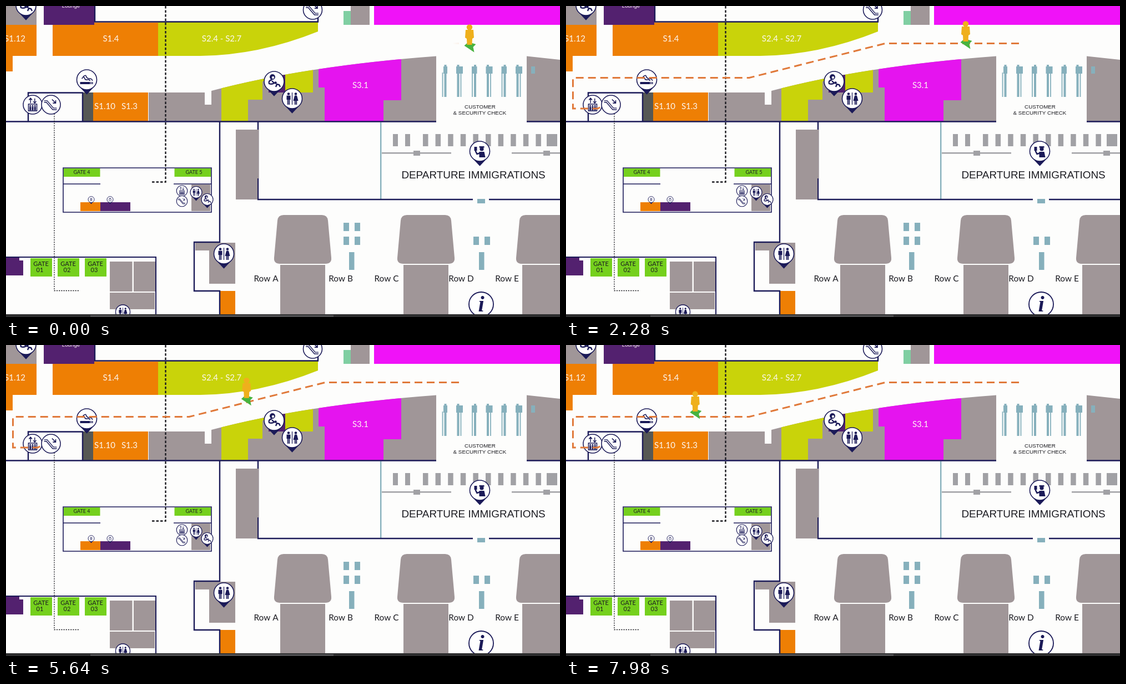
An HTML page with a canvas for the animation above (8 s loop, 998x561 px).

```html
<!DOCTYPE html>
<html lang="en">
<head>
<meta charset="utf-8">
<title>Terminal map walk</title>
<style>
  html, body { margin: 0; width: 100%; height: 100%; overflow: hidden; background: #fdfdfc; }
  canvas { display: block; width: 998px; height: 561px; }
</style>
</head>
<body>
<canvas id="stage" width="998" height="561"></canvas>
<script>
const W = 998, H = 561, LOOP = 8000;
const NAVY = '#1b1a58', GREY = '#a09698', STEEL = '#a1a1a5', ORANGE = '#ee7f04', LIME = '#c9d30a',
      PURPLE = '#53216f', GREEN = '#75d01d', TEAL = '#86b0bc', PINK = '#e514ef',
      WHITE = '#fdfdfc', PALE = '#fdf8f2', BLACK = '#1c1c22';
const GEO = 'Lato, sans-serif', ARIAL = '"Liberation Sans", Arial, sans-serif';

const stage = document.getElementById('stage').getContext('2d');
const map = document.createElement('canvas');
map.width = W;
map.height = H;
const c = map.getContext('2d');

function box(color, x, y, w, h) {
  c.fillStyle = color;
  c.fillRect(x, y, w, h);
}

// A row of n equal boxes, dx apart.
function row(color, n, dx, x, y, w, h) {
  for (let i = 0; i < n; i++) box(color, x + i * dx, y, w, h);
}

function fill(color, path) {
  c.fillStyle = color;
  c.fill(new Path2D(path));
}

function line(color, width, path, dash = []) {
  c.strokeStyle = color;
  c.lineWidth = width;
  c.setLineDash(dash);
  c.stroke(new Path2D(path));
}

const wall = path => line(NAVY, 2.4, path);

function dot(color, x, y, r) {
  c.fillStyle = color;
  c.beginPath();
  c.arc(x, y, r, 0, 7);
  c.fill();
}

function label(str, x, y, size, color = BLACK, font = GEO) {
  c.fillStyle = color;
  c.font = `${size}px ${font}`;
  c.textAlign = 'center';
  c.fillText(str, x, y);
}

// Pictograms, drawn around 0,0 for a badge of radius 18.
const glyphs = {
  people() {
    for (const x of [-6.5, 6.5]) {
      dot(NAVY, x, -8.5, 2.3);
      row(NAVY, 2, 2.6, x - 2.2, 1, 1.8, 10);
    }
    box(NAVY, -10, -5.4, 7, 7.5);
    fill(NAVY, 'M4.5-5.4h4l2.5 9.5h-9z');
    box(NAVY, -.6, -11, 1.2, 22);
  },
  baby() {
    dot(NAVY, -3, -8, 5);
    dot('#fff', -2, -7, 2.2);
    line(NAVY, 2.4, 'M-4-3Q-11-1-9 4Q-4 6 0 3L-4-1');
    dot(NAVY, 2.5, 2.5, 2.3);
    line(NAVY, 2.4, 'M4 5L9 6L11 10M5 5L3 10');
  },
  smoke() {
    box(NAVY, -12, 4, 18, 4);
    row(NAVY, 2, 2.5, 7, 4, 1.5, 4);
    line(NAVY, 1.6, 'M10 2Q10-2 5-2T-1-6T-7-5M6 2Q5-1 1 0T-4-3T-9-2');
  },
  lift() {
    line(NAVY, 1.6, 'M-8-1H8V12H-8Z');
    for (const x of [-4.5, 0, 4.5]) {
      dot(NAVY, x, 2.3, 1.5);
      box(NAVY, x - 1.6, 4, 3.2, 7);
    }
    line(NAVY, 1.5, 'M-4-3V-12M-7-9l3-3.5l3 3.5M4-12V-3M1-6.5l3 3.5l3-3.5');
  },
  escalator() {
    const ramp = 'M-13-6H-8L4 8H11';
    line(NAVY, 4.6, ramp);
    line('#fff', 1.6, ramp);
    line(NAVY, 1.7, 'M2-10L9-3M9-8.5V-3H3.5');
  },
  officer() {
    box(NAVY, -10, -8, 5, 7);
    box(NAVY, -1, -9, 9, 2.6);
    dot(NAVY, 3.5, -4, 3.6);
    fill(NAVY, 'M-1 1H8L10 11H-1Z');
    line(NAVY, 2.6, 'M1 3L-5 5L-8-1');
  },
  fork() {
    row(NAVY, 2, 7, -5, -9, 3, 18);
  },
  bag() {
    line(NAVY, 2, 'M-6-3H6V8H-6ZM-3-3V-8H3V-3');
  },
  info() {
    c.font = 'italic bold 33px "Liberation Serif", serif';
    c.textAlign = 'center';
    c.fillText('i', 0, 10.5);
  }
};

function disc(glyph, x, y, r = 17) {
  dot('#fff', x, y, r);
  c.strokeStyle = NAVY;
  c.lineWidth = .6 + r / 18;
  c.setLineDash([]);
  c.stroke();
  c.save();
  c.translate(x, y);
  c.scale(r / 18, r / 18);
  c.fillStyle = NAVY;
  glyphs[glyph]();
  c.restore();
}

// A disc with a pointed tail.
function pin(glyph, x, y, r = 18) {
  const s = r * .72;
  fill(NAVY, `M${x - s} ${y + s}h${2 * s}L${x} ${y + r * 1.48}Z`);
  disc(glyph, x, y, r);
}

function upperShops() {
  box(GREY, 0, 0, 55, 34);
  fill(ORANGE, 'M0 34H55V90H12V118H0Z');
  box(ORANGE, 84, 30, 190, 60);
  box(PURPLE, 68, 0, 91, 34);
  box('#80cfa2', 608, 9, 13, 25);
  box(GREY, 621, 0, 34, 34);
  box('#f012f8', 663, 0, W, 34);
  fill(LIME, 'M274 29H562V46Q455 89 350 90H274Z');
  wall('M160 0V28.5H562V20');
}

function lowerShops() {
  c.save();
  c.clip(new Path2D('M775 208H257V156H358V178H370V153Q540 108 775 90.5Z'));
  box(GREY, 257, 80, W, 128);
  fill(LIME, 'M388 80H553V156H475V136H462V169H436V208H388Z');
  box(PURPLE, 473, 124, 30, 32);
  fill(PINK, 'M563 80H712V170H680V208H574V147H563Z');
  c.restore();
  fill(GREY, 'M938 90.5L998 97V208H938Z');
  box('#565854', 139, 156, 18, 52);
  box(ORANGE, 157, 156, 99, 52);
}

function security() {
  // Mirrored scanner pairs, each with a rail on its outer side.
  for (let mid = 803; mid < 920; mid += 53.5) {
    for (const side of [-1, 1]) {
      const x = mid + side * 11.5;
      box(TEAL, x - 2, 106, 4, 58);
      row(TEAL, 2, 28, x - 3.5, 109, 7, 13);
      line(TEAL, 1.8, `M${mid + side * 16.5} 120V164`);
    }
  }
  row(STEEL, 2, 22, 697, 231, 9, 22);
  row(STEEL, 10, 22.6, 751, 231, 9.5, 22);
  box(STEEL, 974, 231, 19, 22);
  line(STEEL, 2.4, 'M677 265.2H802M911 265.2H998');
  row(STEEL, 2, 234, 734, 261, 12, 9);
  line(TEAL, 2.4, 'M675.2 210V348');
  box(TEAL, 849, 348, 14, 8);
}

function hall() {
  wall('M40 208V156.5H138V208M0 208.5H775M938 208.5H998');
  wall('M454 208V349H841M870 349H998');
  box(GREY, 414, 223, 39, 126);
  box(GREY, 414, 223, 41.5, 88);
  fill(GREY, 'M341 427H413V501H366V441H341Z');
  box(ORANGE, 386, 514, 27, 42);
  wall('M385 208V426H339V514H385V556');

  for (const x of [483, 705, 919]) {
    fill(GREY, `M${x + 17} 377h69q10 0 11 10l6 67q1 11-11 11h-81q-12 0-11-11l6-67q1-10 11-10z`);
    box(GREY, x + 11, 467, 81, 89);
  }
  row(TEAL, 2, 20, 608, 391, 10, 15);
  for (const x of [608, 842]) {
    row(TEAL, 2, 20, x, 416, 10, 15);
    box(TEAL, x + 10, 444, 9.5, 32);
  }
  for (let i = 0; i < 5; i++)
    label('Row ' + 'ABCDE'[i], 468.5 + (i >> 1) * 217 + (i & 1) * 134.5, 497, 15.4);
}

function gates() {
  box(GREY, 334, 322, 34, 48);
  box(ORANGE, 134, 354, 36, 16);
  box(PURPLE, 170, 354, 54, 16);
  fill(PURPLE, 'M0 454H24V459H31V486H0Z');
  row(GREY, 2, 43, 187, 461, 40.5, 54);
  box(GREY, 187, 517, 81, 30);
  row(GREEN, 2, 199.5, 104, 293, 65.5, 15);
  line(NAVY, 1.6, 'M103 292H370V372H103ZM103 321H170M302 321H370');
  line(NAVY, 2, 'M0 453H270V556');

  for (let i = 0; i < 3; i++) {
    const x = 44 + i * 49;
    box(GREEN, x, 455, 39, 33);
    label('GATE', x + 19, 469, 11);
    label('0' + (i + 1), x + 17, 480, 11);
  }
  label('GATE 4', 136.5, 303, 9);
  label('GATE 5', 338.5, 303, 9);
  line(BLACK, 2.4, 'M287.5 0V317.5H260', [4.5, 3]);
  line(BLACK, 1.3, 'M87 194V513.5H133', [2.2, 2]);
}

function labels() {
  const shop = (name, x, y) => label(name, x, y, 15, PALE);
  shop('S1.12', 16, 64);
  shop('S1.4', 189, 64);
  shop('S2.4 - S2.7', 388.5, 64);
  shop('S1.10', 178, 186);
  shop('S1.3', 222.5, 186);
  shop('S3.1', 638.5, 148);
  label('Lounge', 117, 3, 9.7, PALE, ARIAL);
  label('CUSTOMER', 854, 184.5, 9.8, BLACK, ARIAL);
  label('& SECURITY CHECK', 853.5, 195.5, 9.8, BLACK, ARIAL);
  label('DEPARTURE IMMIGRATIONS', 842, 311, 18.9, BLACK, ARIAL);
}

function badges() {
  pin('baby', 36, -1);
  pin('smoke', 145.5, 133);
  pin('baby', 483, 136);
  pin('people', 515.5, 167);
  pin('officer', 853.5, 262);
  pin('people', 392.5, 447);
  pin('people', 210.5, 552, 13);
  pin('people', 342.5, 336, 10.5);
  pin('baby', 362.5, 349, 10.5);
  pin('fork', 153.5, 349, 5.5);
  pin('bag', 187.5, 349, 5.5);
  disc('escalator', 552.5, 7);
  disc('lift', 48, 178);
  disc('escalator', 81, 178);
  disc('lift', 317, 333.5, 9.8);
  disc('escalator', 317, 352, 9.8);
  disc('info', 856, 538, 22);
}

function drawMap() {
  box(WHITE, 0, 0, W, H);
  upperShops();
  lowerShops();
  security();
  hall();
  gates();
  labels();
  badges();
  box('#2d2d2e', 0, 556, W, 5);
  box('#4e4e50', 152, 557.5, 438, 4);
}

const route = new Path2D('M816 67.5H575L330 129.5H12.5V185H57L67 180');
const arrow = new Path2D('M-9.5 38.5L-2 32L11.5 36L6.5 41L8.5 50.5Z');
const figure = new Path2D('M5.2 5.5A5.2 5.2 0 1 1 5.2 5.4ZM-7 10H7L8 24L5 26L4.5 37H-4.5L-5 26L-8 24Z');

// Corners of the walk: time, centre x, top y.
const walk = [[0, 835, 33], [1020, 832, 27], [3835, 582, 27], [7200, 305, 86], [LOOP, 231, 83]];

// The route is wiped in from right to left behind a soft edge.
function drawRoute(t) {
  const edge = 805 - t * .466;
  const fade = stage.createLinearGradient(edge, 0, edge + 130, 0);
  fade.addColorStop(0, 'rgba(224,121,58,0)');
  fade.addColorStop(1, 'rgba(224,121,58,1)');
  stage.strokeStyle = fade;
  stage.lineWidth = 3;
  stage.setLineDash([14, 8]);
  stage.stroke(route);
}

function drawWalker(t) {
  const i = walk.findIndex(([time]) => t < time);
  const [t0, x0, y0] = walk[i - 1], [t1, x1, y1] = walk[i];
  const p = (t - t0) / (t1 - t0);
  stage.save();
  stage.translate(x0 + (x1 - x0) * p, y0 + (y1 - y0) * p);
  stage.fillStyle = '#48b33f';
  stage.fill(arrow);
  stage.fillStyle = '#efb01c';
  stage.fill(figure);
  stage.restore();
}

const start = performance.now();

function frame() {
  const t = (performance.now() - start) % LOOP;
  stage.drawImage(map, 0, 0);
  drawRoute(t);
  drawWalker(t);
  requestAnimationFrame(frame);
}

drawMap();
frame();
</script>
</body>
</html>
```
